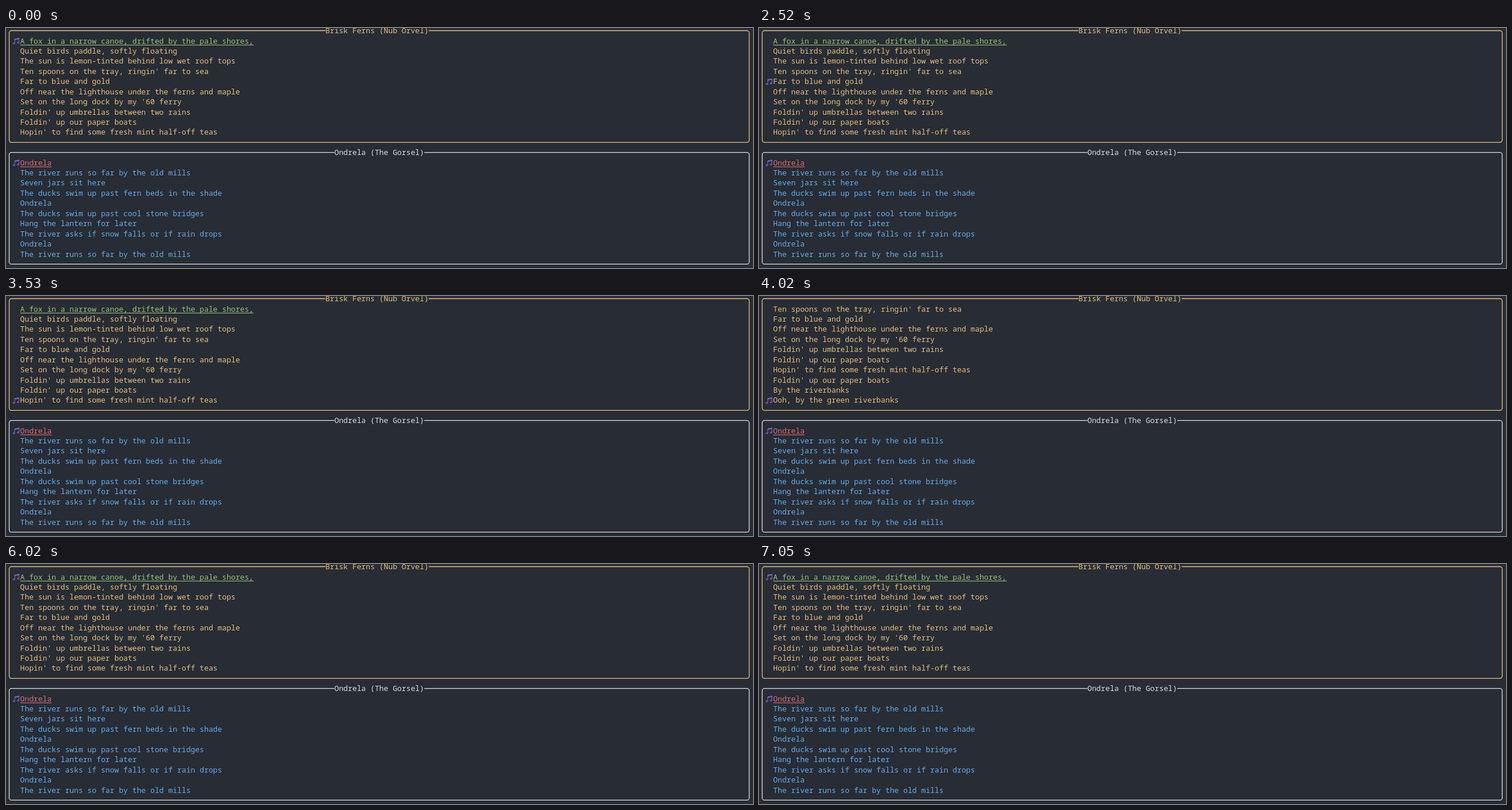
Write an HTML page that moves like this. It is 1280 by 412 pixels and loops after 8000 ms.

```html
<!DOCTYPE html>
<html lang="en">
<head>
<meta charset="utf-8">
<title>Two song panels</title>
<style>
html, body { margin: 0; width: 100%; height: 100%; overflow: hidden; background: #282c34; }
svg { display: block; width: 100vw; height: 100vh; }
text { font: 12.82px "Noto Sans Mono", "DejaVu Sans Mono", monospace; white-space: pre; }
</style>
</head>
<body>
<svg id="stage" viewBox="0 0 1280 412"></svg>
<script>
const LOOP = 8000, ROWS = 10, PITCH = 17.44, CELL = 7.692, LEFT = 24.3;
const BG = '#282c34', YELLOW = '#e5c07b', GREEN = '#98c379',
      WHITE = '#dcdfe4', BLUE = '#61afef', RED = '#e06c75', PURPLE = '#8466d8';

const first = [
  'A fox in a narrow canoe, drifted by the pale shores,',
  'Quiet birds paddle, softly floating',
  'The sun is lemon-tinted behind low wet roof tops',
  "Ten spoons on the tray, ringin' far to sea",
  'Far to blue and gold',
  'Off near the lighthouse under the ferns and maple',
  "Set on the long dock by my '60 ferry",
  "Foldin' up umbrellas between two rains",
  "Foldin' up our paper boats",
  "Hopin' to find some fresh mint half-off teas",
  "Foldin' up our paper boats",
  'By the riverbanks',
  'Ooh, by the green riverbanks'
];
const second = [
  'Ondrela',
  'The river runs so far by the old mills',
  'Seven jars sit here',
  'The ducks swim up past fern beds in the shade',
  'Ondrela',
  'The ducks swim up past cool stone bridges',
  'Hang the lantern for later',
  'The river asks if snow falls or if rain drops',
  'Ondrela',
  'The river runs so far by the old mills'
];

// [start ms, selected line, first visible line]
const steps = [
  [0, 0, 0], [1000, 1, 0], [2000, 2, 0], [2520, 4, 0], [3020, 7, 0], [3530, 9, 0],
  [4020, 12, 3], [5520, 8, 0], [6020, 0, 0], [6550, 12, 3], [7050, 0, 0]
];

const stage = document.getElementById('stage');

function add(tag, attrs, parent = stage) {
  const el = document.createElementNS('http://www.w3.org/2000/svg', tag);
  for (const k in attrs) el.setAttribute(k, attrs[k]);
  return parent.appendChild(el);
}

function makeNote() {
  const note = add('g', { fill: PURPLE, stroke: PURPLE });
  add('path', { d: 'M15 9.6V2.3L22.2 .9V8.4', fill: 'none', 'stroke-width': 1 }, note);
  add('path', { d: 'M15 2.3L22.2 .9V2.3L15 3.7Z', 'stroke-width': .4 }, note);
  for (const [cx, cy] of [[13.4, 9.8], [20.6, 8.6]])
    add('ellipse', { cx, cy, rx: 1.6, ry: 1.2, 'fill-opacity': .4, 'stroke-width': .9 }, note);
  return note;
}

function makePanel({ top, title, column, lines, frame, color, accent }) {
  add('rect', {
    x: 5.5, y: top, width: 1268, height: 11 * PITCH, rx: 4,
    fill: 'none', stroke: frame, 'stroke-width': 1.3
  });
  const x = LEFT + column * CELL;
  add('rect', { x, y: top - 4, width: title.length * CELL, height: 8, fill: BG });
  add('text', { x, y: top + 4.7, fill: frame }).textContent = title;

  const rows = Array.from({ length: ROWS }, (_, i) =>
    add('text', { x: LEFT, y: top + 22 + i * PITCH }));
  const rule = add('rect', { x: LEFT, y: top + 24.2, width: lines[0].length * CELL, height: 1.1, fill: accent });
  const note = makeNote();

  return (selected, offset) => {
    rows.forEach((row, i) => {
      row.textContent = lines[i + offset];
      row.setAttribute('fill', i + offset ? color : accent);
    });
    rule.setAttribute('visibility', offset ? 'hidden' : 'visible');
    note.setAttribute('transform', `translate(0 ${top + 12.2 + (selected - offset) * PITCH})`);
  };
}

const drawFirst = makePanel({
  top: 4.5, title: 'Brisk Ferns (Nub Orvel)', column: 68,
  lines: first, frame: YELLOW, color: YELLOW, accent: GREEN
});
const drawSecond = makePanel({
  top: 213.6, title: 'Ondrela (The Gorsel)', column: 70,
  lines: second, frame: WHITE, color: BLUE, accent: RED
});
drawSecond(0, 0);

let shown;
function update(now) {
  const t = now % LOOP;
  const step = steps.findLast(s => s[0] <= t);
  if (step !== shown) {
    shown = step;
    drawFirst(step[1], step[2]);
  }
}

const start = performance.now();
function tick() {
  update(performance.now() - start);
  requestAnimationFrame(tick);
}
tick();
</script>
</body>
</html>
```
